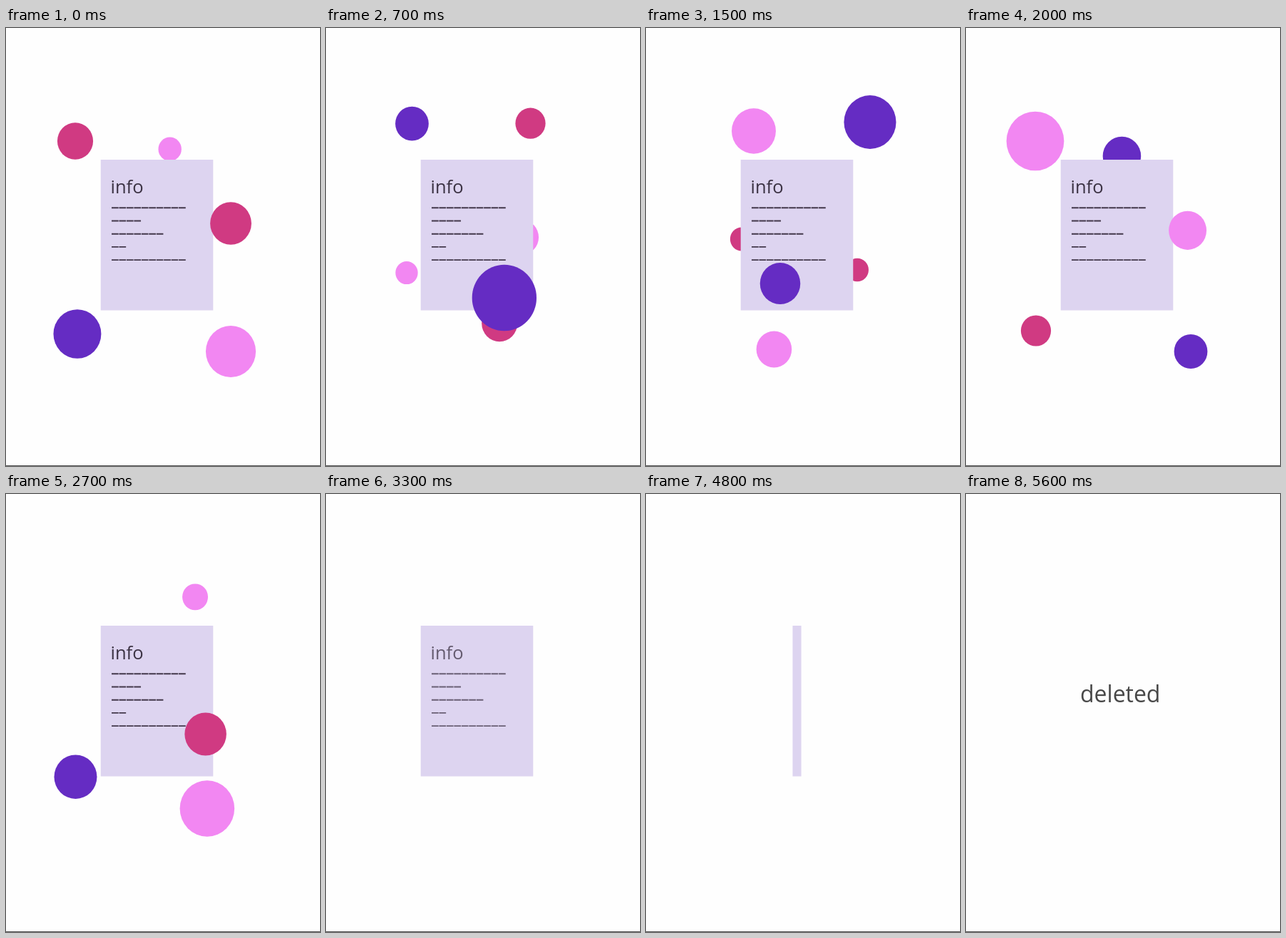
These frames come from a looping animation (440x612 px, 6400 ms). An HTML page with a canvas:

```html
<!DOCTYPE html>
<html lang="en">
<head>
<meta charset="utf-8">
<style>
html, body { margin: 0; height: 100%; overflow: hidden; background: #fff; }
canvas { display: block; }
</style>
</head>
<body>
<canvas id="stage" width="440" height="612"></canvas>
<script>
const ctx = document.getElementById('stage').getContext('2d');
const LOOP = 6400, STEP = 100, PERIOD = 3;
const PINK = '#f287f2', ROSE = '#d03a82', VIOLET = '#652cc3';
const CENTER = [212, 290];

// Closed curves through evenly timed points; `nearest` is the phase closest to the viewer.
const falling = {
  nearest: 2.35,
  points: [[315, 452], [296, 338], [232, 228], [151, 144], [97, 158], [188, 357]]
};
const rising = {
  nearest: 2.85,
  points: [[315, 273], [317, 134], [224, 174], [134, 295], [98, 423], [186, 445]]
};

// `last` is the phase at which a ball stays hidden behind the page.
const balls = [
  { orbit: falling, color: ROSE, size: 20.5, shift: 2, last: 4 },
  { orbit: falling, color: VIOLET, size: 22, shift: 1, last: 4 },
  { orbit: falling, color: PINK, size: 33, shift: 0, last: 4 },
  { orbit: rising, color: PINK, size: 20.5, shift: 0.97, last: 4.2 },
  { orbit: rising, color: ROSE, size: 22.5, shift: 0, last: 4.2 },
  { orbit: rising, color: VIOLET, size: 35, shift: 2.03, last: 7.2 }
];

const clamp = v => Math.max(0, Math.min(1, v));
const mix = (a, b, u) => a + (b - a) * u;

function spline(a, b, c, d, u) {
  return b + u * (c - a + u * (2 * a - 5 * b + 4 * c - d + u * (3 * (b - c) + d - a))) / 2;
}

function along(points, phase) {
  const n = points.length, s = phase / PERIOD * n, i = Math.floor(s);
  const [a, b, c, d] = [-1, 0, 1, 2].map(k => points[(i + k + n) % n]);
  return [0, 1].map(k => spline(a[k], b[k], c[k], d[k], s - i));
}

// Balls speed up after two seconds, then get pulled in behind the page.
function pose({ orbit, size, shift, last }, t) {
  const phase = Math.min(last, shift + t + 0.27 * Math.max(0, t - 2) ** 2);
  const depth = Math.cos(2 * Math.PI * (phase - orbit.nearest) / PERIOD);
  const pull = clamp((t - 2.7) / 0.6) ** 2;
  const [x, y] = along(orbit.points, phase).map((v, k) => mix(v, CENTER[k], pull));
  return { x, y, r: size * (1 + 0.3 * depth) * (1 - pull / 2), front: depth > 0 && t < 3 };
}

function drawBalls(t, front) {
  if (t >= 3.4) return;
  for (const ball of balls) {
    const p = pose(ball, t);
    if (p.front !== front) continue;
    ctx.fillStyle = ball.color;
    ctx.beginPath();
    ctx.ellipse(p.x, p.y, p.r, p.r * 1.025, 0, 0, 2 * Math.PI);
    ctx.fill();
  }
}

function drawText(text, x, y, size, color) {
  ctx.font = `${size}px "Open Sans", "Noto Sans", sans-serif`;
  ctx.fillStyle = color;
  ctx.fillText(text, x, y);
}

function drawPage(t) {
  const width = 157.5 * (1 - clamp((t - 3.6) / 1.3));
  ctx.fillStyle = '#ddd4f0';
  ctx.fillRect(211.5 - width / 2, 184, width, 210.5);

  ctx.globalAlpha = clamp((3.6 - t) / 0.4);
  drawText('info', 146.5, 231, 25.5, '#3c3344');
  ctx.strokeStyle = '#43384b';
  ctx.lineWidth = 1.9;
  ctx.setLineDash([9.7, 0.75]);
  [10, 4, 7, 2, 10].forEach((count, row) => {
    const y = 251.3 + row * 18.2;
    ctx.beginPath();
    ctx.moveTo(148, y);
    ctx.lineTo(148 + count * 10.45, y);
    ctx.stroke();
  });
  ctx.globalAlpha = 1;
}

function draw(t) {
  ctx.fillStyle = '#fefefe';
  ctx.fillRect(0, 0, 440, 612);
  drawBalls(t, false);
  drawPage(t);
  drawBalls(t, true);
  ctx.globalAlpha = clamp((t - 4.9) / 0.6);
  drawText('deleted', 160, 290.5, 32, '#484848');
  ctx.globalAlpha = 1;
  ctx.fillStyle = '#555';
  ctx.fillRect(0, 611, 440, 1);
}

const start = performance.now();
function tick() {
  const elapsed = (performance.now() - start) % LOOP;
  draw(Math.floor(elapsed / STEP) * STEP / 1000);
  requestAnimationFrame(tick);
}
tick();
</script>
</body>
</html>
```
